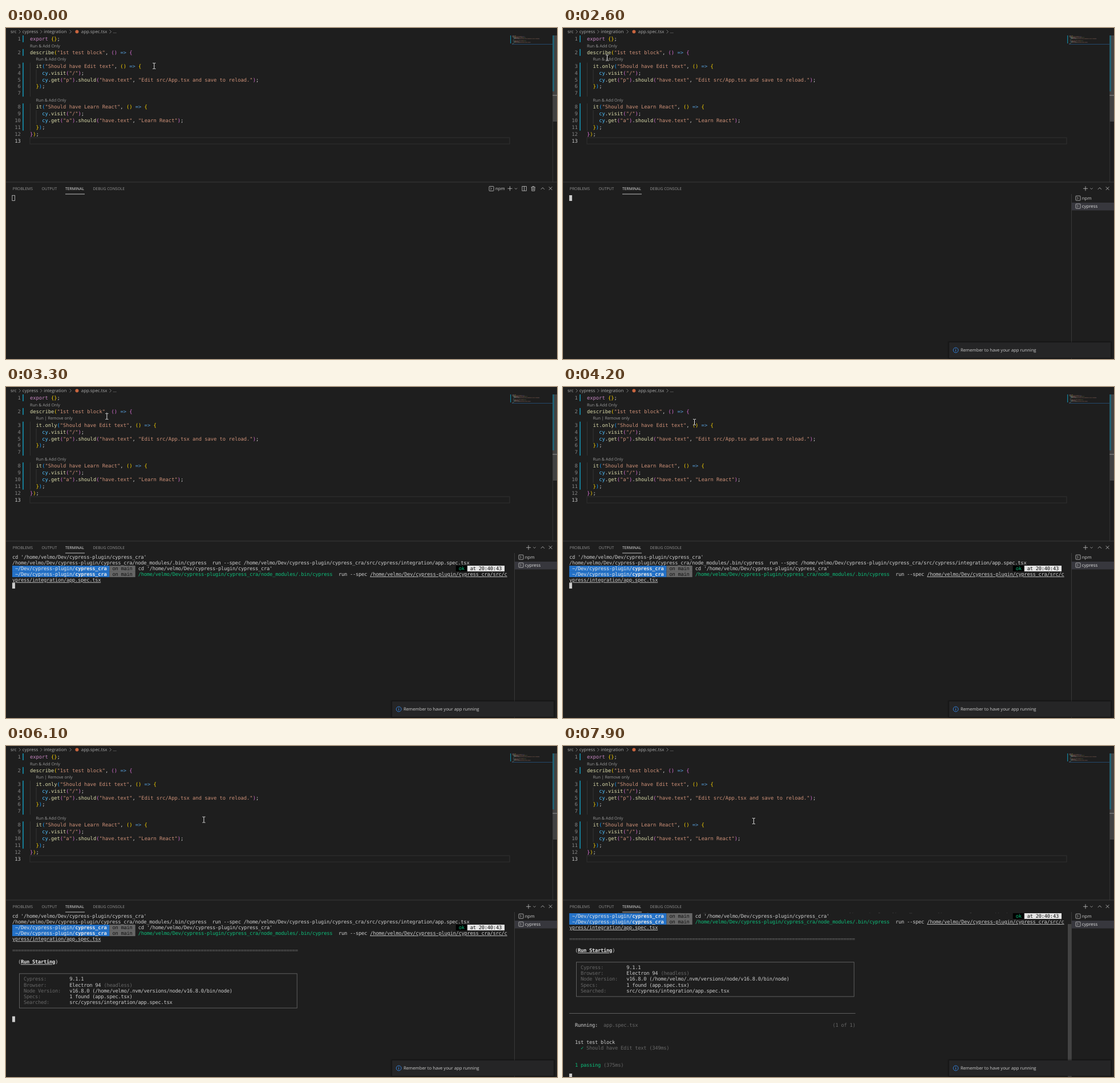
Animation, 966 px wide and 580 px high, one loop 8000 ms. Source, as an HTML page:

```html
<!DOCTYPE html>
<html lang="en">
<head>
<meta charset="utf-8">
<title>Editor test run</title>
<style>
html, body { margin: 0; width: 100%; height: 100%; overflow: hidden; background: #1e1e1e; }
svg { display: block; width: 966px; height: 580px; }
text { white-space: pre; text-rendering: geometricPrecision; }
.ui { font-family: "Open Sans", "Noto Sans", sans-serif; }
.code { font: 8.78px "DejaVu Sans Mono", monospace; }
.term { font: 8.78px "DejaVu Sans Mono", monospace; letter-spacing: -.268px; fill: #ccc; }
.bold { font-weight: bold; fill: #e5e5e5; }
.under { text-decoration: underline; }
.dim { fill: #666; }
.ok { fill: #0dbc79; }
.ink { fill: #111; }
.path { fill: #e5e5e5; }
</style>
</head>
<body>
<svg id="stage" viewBox="0 0 966 580" xmlns="http://www.w3.org/2000/svg"></svg>
<script>
const LOOP = 8000, STEP = 100;
const stage = document.getElementById('stage');
const timed = [];

function el(parent, tag, attrs = {}, text) {
  const node = document.createElementNS('http://www.w3.org/2000/svg', tag);
  for (const k in attrs) node.setAttribute(k, attrs[k]);
  if (text !== undefined) node.textContent = text;
  return parent.appendChild(node);
}
const group = (parent, from = 0, to = LOOP) => {
  const g = el(parent, 'g');
  if (from > 0 || to < LOOP) timed.push({ g, from, to });
  return g;
};
const rect = (p, x, y, width, height, fill, more) => el(p, 'rect', { x, y, width, height, fill, ...more });
const line = (p, d, stroke = '#c5c5c5', width = .8) =>
  el(p, 'path', { d, stroke, fill: 'none', 'stroke-width': width });
const label = (p, x, y, size, fill, text) =>
  el(p, 'text', { class: 'ui', x, y, 'font-size': size, fill }, text);

// Editor
const ROW = 11.918, TOP = 13, LEFT = 42, CHAR = 5.285;
const rowY = r => TOP + r * ROW;
const COLORS = {
  k: '#c586c0', y: '#ffd700', o: '#da70d6', b: '#179fff', f: '#dcdcaa',
  s: '#ce9178', a: '#569cd6', v: '#4fc1ff', w: '#d4d4d4'
};
const itLine = (only, title) =>
  `w:  |f:it|${only ? 'w:.|f:only|' : ''}b:(|s:"${title}"|w:, |y:()|w: |a:=>|w: |y:{`;
const getLine = (tag, text) =>
  `w:    |v:cy|w:.|f:get|o:(|s:"${tag}"|o:)|w:.|f:should|o:(|s:"have.text"|w:, |s:"${text}"|o:)|w:;`;
const VISIT = 'w:    |v:cy|w:.|f:visit|o:(|s:"/"|o:)|w:;';
const CLOSE = 'w:  |y:}|b:)|w:;';
const ONLY_AT = 2400, LENS_AT = 3200;

// row, line number, tokens, from, to
const SOURCE = [
  [0, 1, 'k:export|w: |y:{}|w:;'],
  [2, 2, 'f:describe|y:(|s:"1st test block"|w:, |o:()|w: |a:=>|w: |o:{'],
  [4, 3, itLine(false, 'Should have Edit text'), 0, ONLY_AT],
  [4, 3, itLine(true, 'Should have Edit text'), ONLY_AT],
  [5, 4, VISIT],
  [6, 5, getLine('p', 'Edit src/App.tsx and save to reload.')],
  [7, 6, CLOSE],
  [8, 7, ''],
  [10, 8, itLine(false, 'Should have Learn React')],
  [11, 9, VISIT],
  [12, 10, getLine('a', 'Learn React')],
  [13, 11, CLOSE],
  [14, 12, 'o:}|y:)|w:;'],
  [15, 13, '']
];

function drawEditor() {
  const g = group(stage);
  rect(g, LEFT, rowY(15) + .4, 841, 11, 'none', { stroke: '#303030', 'stroke-width': 1 });
  for (const [r, n] of [[0, 1], [2, 1], [4, 5], [10, 4]])
    rect(g, 29, rowY(r), 1.9, n * ROW, '#16809a');
  line(g, `M42.4 ${rowY(4)}V${rowY(9)}M42.4 ${rowY(10)}V${rowY(14)}` +
    `M53 ${rowY(5)}V${rowY(7)}M53 ${rowY(11)}V${rowY(13)}`, '#404040', .7);

  for (const [r, num, src, from, to] of SOURCE) {
    const row = group(g, from, to), y = rowY(r) + 9;
    el(row, 'text', { class: 'code', x: 25.7, y, 'text-anchor': 'end', fill: num === 13 ? '#c6c6c6' : '#858585' }, num);
    if (!src) continue;
    const text = el(row, 'text', { class: 'code', x: LEFT, y });
    let col = 0;
    for (const token of src.split('|')) {
      const fill = COLORS[token[0]], word = token.slice(2);
      el(text, 'tspan', { fill }, word);
      for (const m of word.matchAll(/[^ ]+/g))
        rect(row, 887.5 + (col + m.index) * .627, 13.4 + (num - 1) * 1.254, m[0].length * .627, .8, fill, { opacity: .45 });
      col += word.length;
    }
  }
  const lens = (r, x, text, from, to) => label(group(g, from, to), x, rowY(r) + 8.6, 7.2, '#999', text);
  lens(1, LEFT, 'Run & Add Only');
  lens(3, LEFT + 2 * CHAR, 'Run & Add Only', 0, LENS_AT);
  lens(3, LEFT + 2 * CHAR, 'Run | Remove only', LENS_AT);
  lens(9, LEFT + 2 * CHAR, 'Run & Add Only');

  // Breadcrumb
  for (const [x, text] of [[8, 'src'], [28.8, 'cypress'], [66.3, 'integration'], [131.8, 'app.spec.tsx'], [187.8, '…']])
    label(g, x, 9.3, 7.85, '#a9a9a9', text);
  for (const x of [22.6, 60.2, 111.6, 181.6]) line(g, `M${x} 3.6l2.9 2.9l-2.9 2.9`, '#a0a0a0', .7);
  el(g, 'circle', { cx: 124.4, cy: 6.5, r: 3, fill: '#c9653f' });

  // Minimap edge and scrollbar
  rect(g, 884, 13, 1.3, 14, '#16809a');
  rect(g, 887, 28, 71, 1, '#24486b');
  rect(g, 958, 13, .7, 257, '#3c3c3c');
  rect(g, 958.7, 13, 7.3, 151, '#424242');
  rect(g, 958.3, 13, 2.6, 98, '#1f6478');
  rect(g, 958.3, 117.4, 7.7, 1.2, '#858585');
}

// Panel
function termIcon(p, x, y) {
  rect(p, x - 4, y - 4, 8, 8, 'none', { stroke: '#c5c5c5', 'stroke-width': .8, rx: .8 });
  line(p, `M${x - 1.8} ${y - 2}l2.1 2l-2.1 2`);
}
function addIcon(p, x) {
  line(p, `M${x - 4} 281.3h8M${x} 277.3v8`);
  line(p, `M${x + 8.4} 280.4l2.1 2.1l2.1 -2.1`, '#c5c5c5', .7);
}
const PANEL_AT = 2500;

function drawPanel() {
  const g = group(stage);
  rect(g, 0, 269.6, 966, .8, '#434343');
  for (const [x, text] of [[11.8, 'PROBLEMS'], [62.4, 'OUTPUT'], [104, 'TERMINAL'], [152.4, 'DEBUG CONSOLE']])
    label(g, x, 283.5, 6.8, text === 'TERMINAL' ? '#e7e7e7' : '#969696', text);
  rect(g, 104, 290.6, 34, .8, '#e7e7e7');
  line(g, 'M937.8 282.8l3.1 -3.1l3.1 3.1M951.8 278.3l5.6 5.6M957.4 278.3l-5.6 5.6');

  const single = group(g, 0, PANEL_AT);
  termIcon(single, 851, 281.5);
  label(single, 858, 284, 7.7, '#ccc', 'npm');
  addIcon(single, 883.5);
  rect(single, 904.9, 277.6, 7.4, 7.6, 'none', { stroke: '#c5c5c5', 'stroke-width': .8 });
  line(single, 'M908.6 277.6v7.6M920.6 279h7.4M923 279v-1.4h2.6v1.4M921.4 279l.4 6.4h5l.4 -6.4M923.4 280.6v3.4M925.2 280.6v3.4');
  rect(single, 10.9, 293.3, 4.6, 9.3, 'none', { stroke: '#ccc', 'stroke-width': .8 });

  const split = group(g, PANEL_AT);
  addIcon(split, 916);
  rect(split, 891.2, 291, .7, 289, '#454545');
  rect(split, 892, 306, 74, 13.6, '#37373d');
  termIcon(split, 903, 298.2);
  termIcon(split, 903, 312.2);
  label(split, 909.8, 301.3, 7.85, '#ccc', 'npm');
  label(split, 909.8, 315.3, 7.85, '#ddd', 'cypress');
}

// Terminal
const CELL = 5.0182, LINE = 10.036, TX = 10.9, TY = 293, SCROLL_AT = 7400;
const HOME = '/home/velmo', PROJECT = HOME + '/Dev/cypress-plugin/cypress_cra';
const BIN = PROJECT + '/node_modules/.bin/cypress';
const CD = `cd '${PROJECT}'`;
const colX = c => TX + c * CELL;
let scroller, cursor, typed;

function put(p, row, ...segs) {
  for (const [col, text, cls = ''] of segs)
    el(p, 'text', { class: 'term ' + cls, x: colX(col), y: TY + row * LINE + 8.1 }, text);
}
const cells = (p, row, col, n, fill) => rect(p, colX(col), TY + row * LINE, n * CELL, LINE, fill);

function prompt(p, row) {
  cells(p, row, 0, 34, '#2472c8');
  cells(p, row, 34, 9, '#666');
  put(p, row, [1, '~/Dev/cypress-plugin/', 'path'], [22, 'cypress_cra', 'bold'], [35, 'on main', 'ink']);
}

function drawTerminal() {
  const clip = el(el(stage, 'defs'), 'clipPath', { id: 'view' });
  rect(clip, 0, 292.8, 891, 288, '#000');
  scroller = el(el(stage, 'g', { 'clip-path': 'url(#view)' }), 'g');
  const at = time => group(scroller, time);

  let g = at(2700);
  put(g, 0, [0, CD]);
  put(g, 1, [0, `${BIN}  run --spec ${PROJECT}/src/cypress/integration/app.spec.tsx`]);

  g = at(2900);
  prompt(g, 2);
  put(g, 2, [44, '']);
  typed = g.lastChild;
  cells(g, 2, 155, 4, '#000');
  cells(g, 2, 159, 13, '#e5e5e5');
  put(g, 2, [156, 'ok', 'ok'], [160, 'at 20:40:43', 'ink']);

  prompt(at(3100), 3);
  g = at(3200);
  put(g, 3, [44, BIN, 'ok'], [114, 'run --spec'], [125, PROJECT + '/src/c', 'under']);
  put(g, 4, [0, 'ypress/integration/app.spec.tsx', 'under']);

  g = at(5400);
  put(g, 6, [0, '='.repeat(100), 'dim']);
  put(g, 8, [2, '('], [3, 'Run Starting', 'bold under'], [15, ')']);

  g = at(6000);
  rect(g, colX(2.5), TY + 10.55 * LINE, 97 * CELL, 6 * LINE, 'none', { stroke: '#707070', 'stroke-width': .8 });
  const info = [
    ['Cypress:', '9.1.1'], ['Browser:', 'Electron 94'],
    ['Node Version:', `v16.8.0 (${HOME}/.nvm/versions/node/v16.8.0/bin/node)`],
    ['Specs:', '1 found (app.spec.tsx)'], ['Searched:', 'src/cypress/integration/app.spec.tsx']
  ];
  info.forEach(([key, value], i) => put(g, 11 + i, [4, key, 'dim'], [20, value]));
  put(g, 12, [32, '(headless)', 'dim']);

  g = at(6200);
  rect(g, TX, TY + 19.5 * LINE - .4, 100 * CELL, .8, '#707070');
  put(g, 21, [2, 'Running:'], [12, 'app.spec.tsx', 'dim'], [92, '(1 of 1)', 'dim']);

  put(at(7000), 24, [2, '1st test block']);
  put(at(7100), 25, [4, '✓', 'ok'], [6, 'Should have Edit text (349ms)', 'dim']);
  put(at(SCROLL_AT), 28, [2, '1 passing', 'ok'], [12, '(375ms)', 'dim']);

  cursor = rect(scroller, 0, 0, CELL, LINE, '#ccc');
  rect(group(stage, SCROLL_AT), 885, 312, 6.3, 268, '#434343');
}

function drawToast() {
  const g = group(stage, 2600);
  for (const grow of [3, 2, 1])
    rect(g, 677 - grow, 551 - grow, 283 + 2 * grow, 27 + 2 * grow, '#000', { opacity: .1, rx: grow });
  rect(g, 677, 551, 283, 27, '#252526');
  el(g, 'circle', { cx: 688.6, cy: 564.5, r: 4.4, fill: 'none', stroke: '#3794ff', 'stroke-width': .8 });
  line(g, 'M688.6 563.8v3M688.6 561.9v1', '#3794ff', .9);
  label(g, 697, 567.4, 7.7, '#ccc', 'Remember to have your app running');
}

// Mouse pointer: time, x, y
const TRACK = [
  [0, 259.8, 66.5], [100, 259.8, 66.5], [200, 275, 69.5], [500, 275, 69.5], [700, 258, 73],
  [1000, 175, 77], [1200, 120, 75.5], [1400, 87, 69.5], [1500, 84, 66], [1600, 80, 62], [1700, 78.2, 59],
  [1900, 73, 53], [2300, 73, 53], [2700, 79, 52], [3000, 95.8, 50.5], [3200, 167.5, 50.5],
  [3600, 205, 55], [4100, 228.5, 60.8], [4200, 230.5, 61.5], [4400, 234.8, 62.5], [4500, 234.8, 62.5],
  [4800, 253.5, 64.5], [4900, 253.5, 64.5], [5200, 278.5, 74.5], [5300, 278.5, 74.5], [5400, 283, 76],
  [5800, 318, 107], [6200, 356.5, 136.5], [6500, 378.6, 145], [6900, 378.6, 145], [7100, 378.6, 145],
  [7500, 335.5, 131.5], [7700, 335.5, 131.5], [7900, 334.3, 131.5]
];
// Terminal cursor: time, row, column
const CURSOR = [
  [2500, 0, 0], [2700, 2, 0], [2900, 2, 44], [3000, 2, 58], [3100, 3, 44], [3200, 5, 0], [5400, 10, 0],
  [6000, 18, 0], [6200, 22, 0], [6700, 24, 0], [7000, 25, 0], [7100, 26, 0], [SCROLL_AT, 30, 0]
];
let pointer;

function drawPointer() {
  pointer = el(stage, 'g');
  const beam = 'M-2.5 -5H-.7L0 -4.4L.7 -5H2.5M-2.5 5H-.7L0 4.4L.7 5H2.5M0 -4.4V4.4';
  for (const [from, to] of [[0, 1600], [2500, LOOP]]) {
    const g = group(pointer, from, to);
    line(g, beam, '#111', 2);
    line(g, beam, '#f0f0f0', 1);
  }
  el(group(pointer, 1600, 2500), 'path', {
    d: 'M0 0V11L2.6 8.6L4.4 12.6L6.2 11.8L4.4 7.9H7.9Z', fill: '#111', stroke: '#f0f0f0', 'stroke-width': .9
  });
}

const lastBefore = (list, t) => list.filter(k => k[0] <= t).pop();

function update(t) {
  for (const { g, from, to } of timed) g.style.display = t >= from && t < to ? '' : 'none';

  const a = lastBefore(TRACK, t), b = TRACK.find(k => k[0] > t) || a;
  const p = b === a ? 0 : (t - a[0]) / (b[0] - a[0]);
  pointer.setAttribute('transform', `translate(${a[1] + (b[1] - a[1]) * p} ${a[2] + (b[2] - a[2]) * p})`);

  typed.textContent = t >= 3100 ? CD : t >= 3000 ? CD.slice(0, 14) : '';
  const c = lastBefore(CURSOR, t);
  cursor.style.display = c ? '' : 'none';
  if (c) {
    cursor.setAttribute('x', colX(c[2]));
    cursor.setAttribute('y', TY + c[1] * LINE);
  }
  scroller.setAttribute('transform', `translate(0 ${t >= SCROLL_AT ? -2 * LINE : 0})`);
}

rect(stage, 0, 0, 966, 580, '#1e1e1e');
drawEditor();
drawPanel();
drawTerminal();
drawToast();
drawPointer();

const start = performance.now();
function tick() {
  const t = (performance.now() - start) % LOOP;
  update(Math.floor(t / STEP) * STEP);
  requestAnimationFrame(tick);
}
tick();
</script>
</body>
</html>
```
